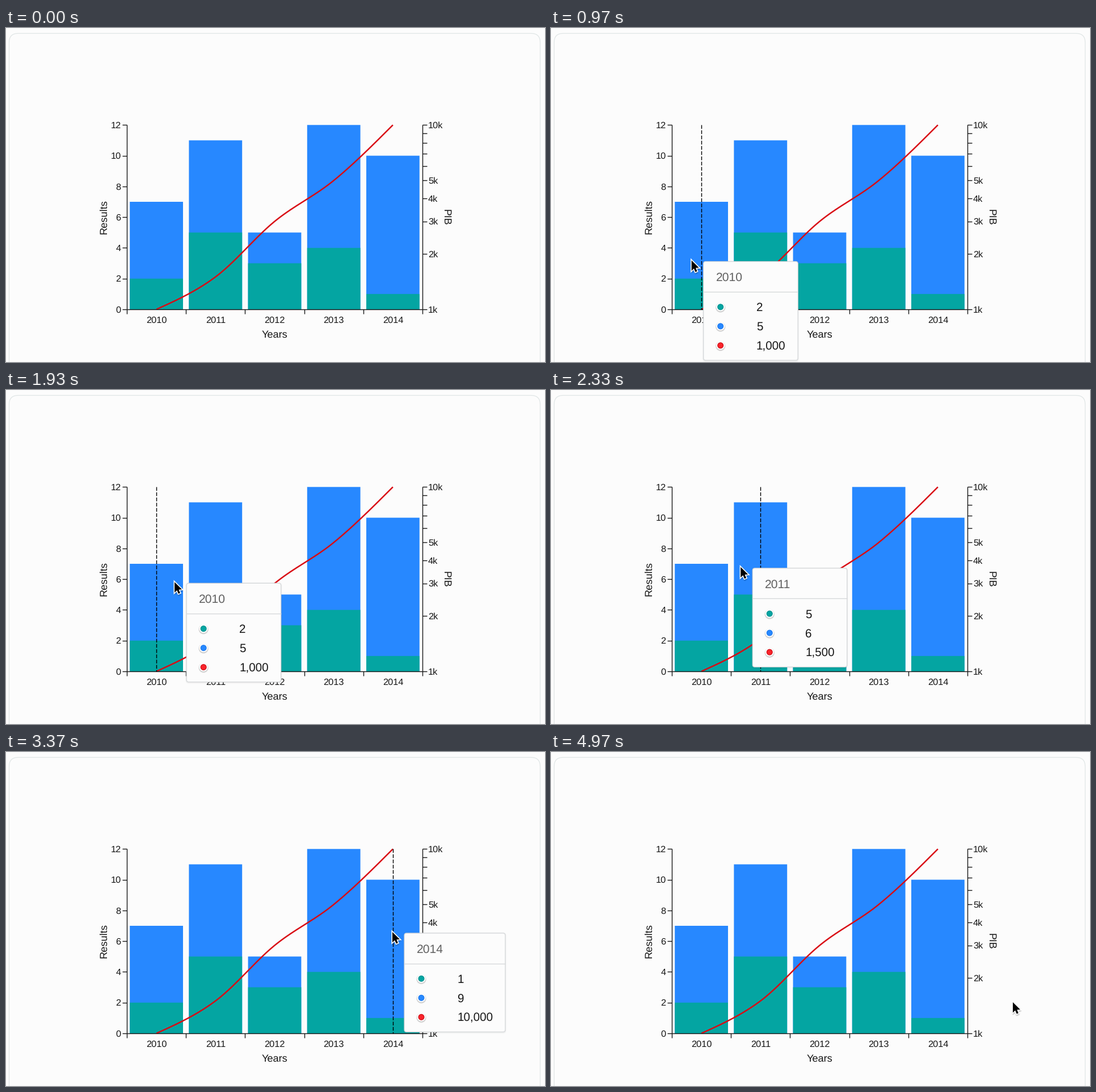
A matplotlib script for the animation above (5.01 s loop, 950 by 590 pixels).

```python
import matplotlib.pyplot as plt
import numpy as np
from matplotlib.animation import FuncAnimation
from matplotlib.patches import Circle, FancyBboxPatch, Polygon, Rectangle
from matplotlib.transforms import Affine2D

W, H, DPI = 950, 590, 100
FRAMES, STEP = 167, 30
PX = 72 / DPI  # points per pixel

BG, INK, GREY = "#fcfcfc", "#161616", "#606060"
TEAL, BLUE, RED = "#04a5a2", "#2788ff", "#d90b14"

LEFT, RIGHT, TOP, BASE = 213.0, 734.0, 171.3, 497.0
BAND = (RIGHT - LEFT) / 5
YEARS = [2010, 2011, 2012, 2013, 2014]
LOWER = [2, 5, 3, 4, 1]
UPPER = [5, 6, 2, 8, 9]
PIB = [1000, 1500, 3000, 5000, 10000]

# Pointer path: time in ms, x, y
PATH = np.array([
    (30, 150, 590), (540, 229, 424), (830, 247.7, 410.5), (970, 247.7, 410.5),
    (1370, 268.6, 373.8), (1500, 272, 362), (2030, 305, 334), (2330, 335, 312.7),
    (2530, 372, 311), (3070, 661, 317), (3260, 681, 318), (3630, 681, 318),
    (4080, 697.7, 318), (4170, 697.7, 318), (4640, 814, 442), (5010, 814, 442),
])

plt.rcParams["font.family"] = "Liberation Sans"
plt.rcParams["text.hinting"] = "none"

fig = plt.figure(figsize=(W / DPI, H / DPI), dpi=DPI, facecolor=BG)
ax = fig.add_axes([0, 0, 1, 1])
ax.set_xlim(0, W)
ax.set_ylim(H, 0)
ax.axis("off")


def monotone(xs, ys, at):
    """Monotone cubic interpolation of the points (xs, ys)."""
    xs, ys = np.asarray(xs, float), np.asarray(ys, float)
    h = np.diff(xs)
    s = np.diff(ys) / h
    mean = (s[:-1] * h[1:] + s[1:] * h[:-1]) / (h[:-1] + h[1:])
    limit = np.minimum(np.minimum(abs(s[:-1]), abs(s[1:])), abs(mean) / 2)
    inner = (np.sign(s[:-1]) + np.sign(s[1:])) * limit
    m = np.concatenate([[(3 * s[0] - inner[0]) / 2], inner,
                        [(3 * s[-1] - inner[-1]) / 2]])
    at = np.clip(at, xs[0], xs[-1])
    i = np.clip(np.searchsorted(xs, at, side="right") - 1, 0, len(h) - 1)
    u = (at - xs[i]) / h[i]
    return ((1 + 2 * u) * (1 - u) ** 2 * ys[i] + u * u * (3 - 2 * u) * ys[i + 1]
            + h[i] * u * (1 - u) * ((1 - u) * m[i] - u * m[i + 1]))


def count_y(v):
    return BASE - v / 12 * (BASE - TOP)


def log_y(v):
    return BASE - (np.log10(v) - 3) * (BASE - TOP)


def center_x(i):
    return LEFT + (i + 0.5) * BAND


def stroke(xs, ys, color=INK, width=1.4, z=4, **kw):
    return ax.plot(xs, ys, color=color, lw=width * PX, zorder=z,
                   solid_capstyle="butt", **kw)[0]


def label(x, y, s, size=16.4, ha="left", color=INK, **kw):
    return ax.text(x, y, s, fontsize=size * PX, ha=ha, va="baseline",
                   color=color, rotation_mode="anchor", **kw)


def rounded(x, y, w, h, radius, **kw):
    box = FancyBboxPatch((x, y), w, h,
                         boxstyle=f"round,pad=0,rounding_size={radius}", **kw)
    return ax.add_patch(box)


# Card
rounded(5.5, 9.5, 936, 640, 16, fc="none", ec="#dfe5e5", lw=1.2 * PX, zorder=1)
stroke([0, W], [589.5, 589.5], "#f0f0f0", 1, 1)

# Stacked bars
for i, (low, up) in enumerate(zip(LOWER, UPPER)):
    x, w = LEFT + (i + 0.05) * BAND, 0.9 * BAND
    for bottom, top, color in ((0, low + up, BLUE), (0, low, TEAL)):
        ax.add_patch(Rectangle((x, count_y(top)), w,
                               count_y(bottom) - count_y(top),
                               fc=color, lw=0, zorder=2, snap=False))
    label(center_x(i), 520.8, str(YEARS[i]), ha="center")

# Trend line
xs = np.linspace(center_x(0), center_x(4), 240)
stroke(xs, monotone([center_x(i) for i in range(5)], log_y(np.array(PIB)), xs),
       RED, 2.5, 3)

# Axes
stroke([LEFT, LEFT], [TOP - 0.7, BASE])
stroke([RIGHT, RIGHT], [TOP - 0.7, BASE])
stroke([LEFT, RIGHT], [BASE, BASE])
for k in range(6):
    stroke([LEFT + k * BAND] * 2, [BASE, BASE + 7.8])
for v in range(0, 13, 2):
    y = count_y(v)
    stroke([LEFT - 7.8, LEFT], [y, y])
    label(202.6, y + 5.7, str(v), ha="right")
for k in range(1, 11):
    y = log_y(1000 * k)
    stroke([RIGHT, RIGHT + 7.8], [y, y])
    if k < 6 or k == 10:
        label(744, y + 5.7, f"{k}k")
label(473.5, 547.2, "Years", 18.2, "center")
label(177.3, 334, "Results", 18.3, "center", rotation=90)
label(770.9, 334, "PIB", 17.8, "center", rotation=270)

guide = stroke([0, 0], [TOP, BASE], "black", 1.4, 5, dashes=(4.7, 1.9))

# Pointer and tooltip share one offset
shift = Affine2D()
moving = shift + ax.transData
VALUE = 20.6
tip = []

for grow in (2, 1):
    tip.append(rounded(21 - grow, 2.5 - grow, 166 + 2 * grow, 175 + 2 * grow,
                       4 + grow, fc="black", alpha=0.025, lw=0,
                       transform=moving, zorder=7))
panel = rounded(21, 2, 166, 174.5, 4, fc=BG, ec="#d4d7d9", lw=1.3 * PX,
                transform=moving, zorder=8)
rule = stroke([21, 187], [55.5, 55.5], "#d4d7d9", 1.3, 9, transform=moving)
title = label(43, 36.6, "", 21.1, color=GREY, transform=moving, zorder=10)
tip += [panel, rule, title]

values = []
for k, (fill, edge) in enumerate(((TEAL, "#03928f"), (BLUE, "#1f7bee"),
                                  ("#f9242b", "#cf1018"))):
    y = 82.3 + 34 * k
    for r, dy, kw in ((8.8, 1.3, dict(fc="black", alpha=0.07, lw=0)),
                      (8.2, 0.9, dict(fc="black", alpha=0.14, lw=0)),
                      (7.6, 0, dict(fc="white", lw=0)),
                      (4.9, 0, dict(fc=fill, ec=edge, lw=1.2 * PX))):
        tip.append(ax.add_patch(Circle((51, y + dy), r, transform=moving,
                                       zorder=9, **kw)))
    values.append(label(114, y + 7.4, "", VALUE, transform=moving, zorder=10))
tip += values

ARROW = 1.08 * np.array([(0, 0), (0, 17), (3.9, 13.4), (6.3, 19), (9.1, 17.8),
                         (6.8, 12.3), (12, 12)])
pointer = []
for width in (5, 3.5, 2):
    pointer.append(Polygon(ARROW + (0.3, 1.8), fc="black", ec="black", alpha=0.07,
                           lw=width * PX, joinstyle="round"))
pointer.append(Polygon(ARROW, fc="white", ec="white", lw=3.2 * PX))
pointer.append(Polygon(ARROW, fc="black", lw=0))
for part in pointer:
    part.set_transform(moving)
    part.set_zorder(12)
    ax.add_patch(part)


def fill_tooltip(i):
    rows = [str(LOWER[i]), str(UPPER[i]), f"{PIB[i]:,}"]
    for text, row in zip(values, rows):
        text.set_text(row)
    title.set_text(str(YEARS[i]))
    digits = len(rows[2]) - 1
    width = 115 + VALUE * (0.556 * digits + 0.278)
    panel.set_width(width)
    rule.set_xdata([21, 21 + width])
    for grow, shade in zip((2, 1), tip):
        shade.set_width(width + 2 * grow)


def update(frame):
    t = (frame + 0.5) * STEP
    x, y = (float(monotone(PATH[:, 0], PATH[:, c], t)) for c in (1, 2))
    shift.clear().translate(x, y)
    inside = frame > 0 and LEFT <= x <= RIGHT and TOP <= y <= BASE
    if inside:
        i = min(int((x - LEFT) / BAND), 4)
        fill_tooltip(i)
        guide.set_xdata([center_x(i)] * 2)
    for part in tip + [guide]:
        part.set_visible(inside)
    for part in pointer:
        part.set_visible(frame > 0)
    return []


anim = FuncAnimation(fig, update, frames=FRAMES, interval=STEP,
                     init_func=lambda: update(0), repeat=True, repeat_delay=0)
plt.show()
```
